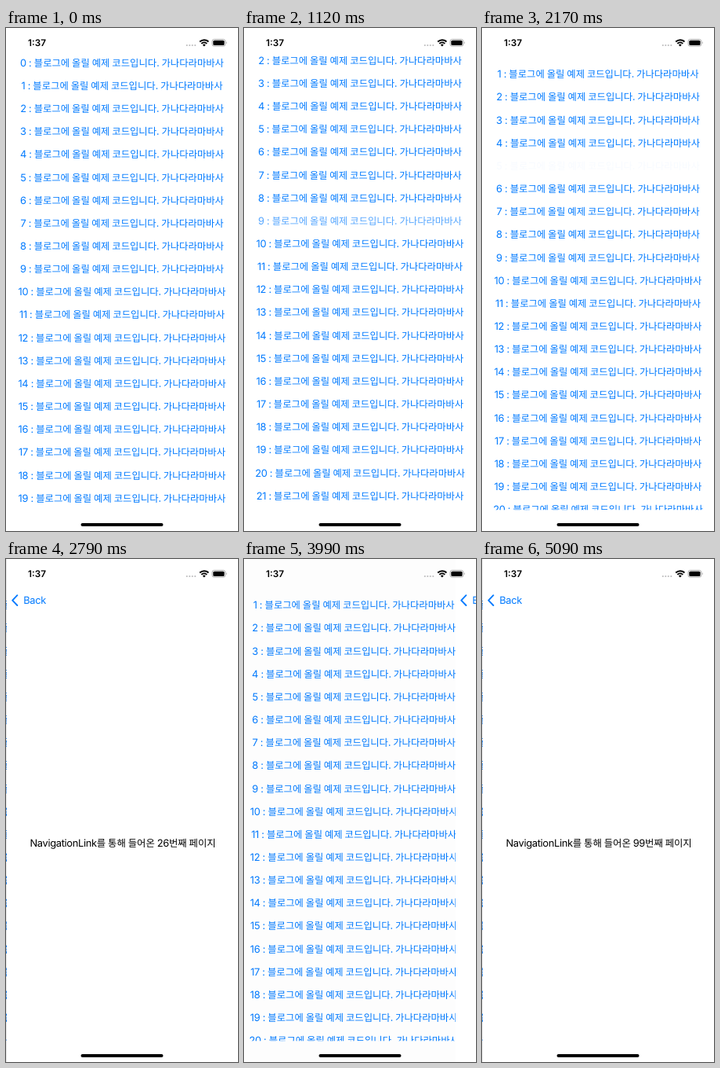
An HTML page for the animation above (5170 ms loop, 296 by 640 pixels).

```html
<!DOCTYPE html>
<html lang="ko">
<head>
<meta charset="utf-8">
<title>List navigation</title>
<style>
html, body { margin: 0; width: 100%; height: 100%; overflow: hidden; background: #fff; }
svg { display: block; width: 296px; height: 640px; }
text { font: 12.9px Inter, Roboto, sans-serif; letter-spacing: -.33px; white-space: pre; text-rendering: geometricPrecision; }
.ko { font: 12.35px "Noto Sans CJK KR", "Noto Sans CJK", sans-serif; letter-spacing: 0; word-spacing: -.55px; }
.clock { font-size: 11.8px; font-weight: 600; letter-spacing: 0; }
.mid { text-anchor: middle; }
.blue { fill: #007aff; }
</style>
</head>
<body>
<svg viewBox="0 0 296 640">
  <defs><clipPath id="safe"><rect y="36" width="296" height="577.3"/></clipPath></defs>
  <rect width="296" height="640" fill="#fff"/>
  <g clip-path="url(#safe)"><g id="list" class="blue mid"></g></g>
  <rect id="dim" width="296" height="640"/>
  <g id="page">
    <rect width="296" height="640" fill="#fff"/>
    <g id="back">
      <path d="M13.4 46.2 7.2 52.6 13.4 59" fill="none" stroke="#007aff" stroke-width="1.9" stroke-linecap="round" stroke-linejoin="round"/>
      <text x="21.2" y="57.1" class="blue">Back</text>
    </g>
    <text id="label" class="mid" x="148" y="366"></text>
  </g>
  <text class="clock mid" x="39.6" y="23.1">1:37</text>
  <g fill="#bdbdbf">
    <circle cx="230.8" cy="22" r="1.1"/><circle cx="234.3" cy="22" r="1.1"/>
    <circle cx="237.8" cy="22" r="1.1"/><circle cx="241.3" cy="22" r="1.1"/>
  </g>
  <g fill="none" stroke="#000" stroke-width="1.9">
    <path d="M247.2 17.5a8 8 0 0 1 11.2 0"/>
    <path d="M249.3 19.9a5 5 0 0 1 7 0"/>
  </g>
  <path d="M252.8 23.5 250.9 21.5a2.7 2.7 0 0 1 3.8 0Z"/>
  <rect x="263" y="14.4" width="16.8" height="8.8" rx="2.6" fill="none" stroke="#a6a6a6" stroke-width=".9"/>
  <rect x="264.3" y="15.7" width="14.2" height="6.2" rx="1.5"/>
  <path d="M280.8 17.3a1.7 1.7 0 0 1 0 3Z" fill="#a6a6a6"/>
  <rect x="95.5" y="630" width="105" height="4" rx="2"/>
</svg>
<script>
const LOOP = 5170, WIDTH = 296, PITCH = 29.16, RATE = 15;
const PUSH_A = 2265, POP = 3720, POP_END = 4200, PUSH_B = 4570;
// moments at which the screen refreshes
const TICKS = [0, 790, 900, 1010, 1120, 1230, 1330, 2170, 2310, 2430, 2550, 2670, 2790,
  3670, 3780, 3880, 3990, 4100, 4220, 4540, 4650, 4760, 4880, 4990, 5090];

const $ = id => document.getElementById(id);
const clamp = v => Math.min(1, Math.max(0, v));

function add(parent, tag, attrs, text = '') {
  const el = document.createElementNS('http://www.w3.org/2000/svg', tag);
  for (const k in attrs) el.setAttribute(k, attrs[k]);
  el.textContent = text;
  return parent.appendChild(el);
}

const rows = Array.from({ length: 23 }, (_, i) => {
  const row = add($('list'), 'text', { x: 148, y: 48.7 + i * PITCH });
  add(row, 'tspan', {}, i + ' : ');
  add(row, 'tspan', { class: 'ko' }, '블로그에 올릴 예제 코드입니다. 가나다라마바사');
  return row;
});

add($('label'), 'tspan', {}, 'NavigationLink');
add($('label'), 'tspan', { class: 'ko' }, '를 통해 들어온 ');
const number = add($('label'), 'tspan', {});
add($('label'), 'tspan', { class: 'ko' }, '번째 페이지');

// critically damped spring: the distance left, from 1 to 0
function spring(ms) {
  const x = RATE * Math.max(0, ms) / 1000;
  return (1 + x) * Math.exp(-x);
}

// share of the screen width by which the page is away
function away(t) {
  if (t >= PUSH_B) return spring(t - PUSH_B);
  if (t >= POP_END) return 1;
  if (t >= POP) return 1 - spring(t - POP);
  return spring(t - PUSH_A);
}

function scroll(t) {
  if (t < 1120) {
    const u = clamp((t - 750) / 370);
    return 61.3 * u * u * (3 - 2 * u);
  }
  return 14.6 + 46.7 * Math.exp(-(t - 1120) / 51);
}

// a tapped row vanishes, then fades back in
function tapped(t, start, push) {
  return t < start || t > push + 400 ? 1 : .03 + .97 * clamp((t - push) / 350);
}

function draw(t) {
  const off = away(t), x = WIDTH * off;
  $('list').setAttribute('transform', `translate(${-.3 * (WIDTH - x)} ${-scroll(t)})`);
  $('dim').setAttribute('opacity', .1 * (1 - off));
  $('page').setAttribute('transform', `translate(${x} 0)`);
  $('back').setAttribute('opacity', t >= 3670 && t < POP ? .3 : 1);
  number.textContent = t < POP_END ? 26 : 99;
  rows[9].setAttribute('opacity', 1 - .33 * clamp(1 - Math.abs(t - 1120) / 100));
  rows[5].setAttribute('opacity', tapped(t, 2170, PUSH_A));
  rows[11].setAttribute('opacity', tapped(t, 4540, PUSH_B));
}

const begin = performance.now();
function frame() {
  const t = (performance.now() - begin) % LOOP;
  draw(TICKS.filter(k => k <= t).pop());
  requestAnimationFrame(frame);
}
frame();
</script>
</body>
</html>
```
